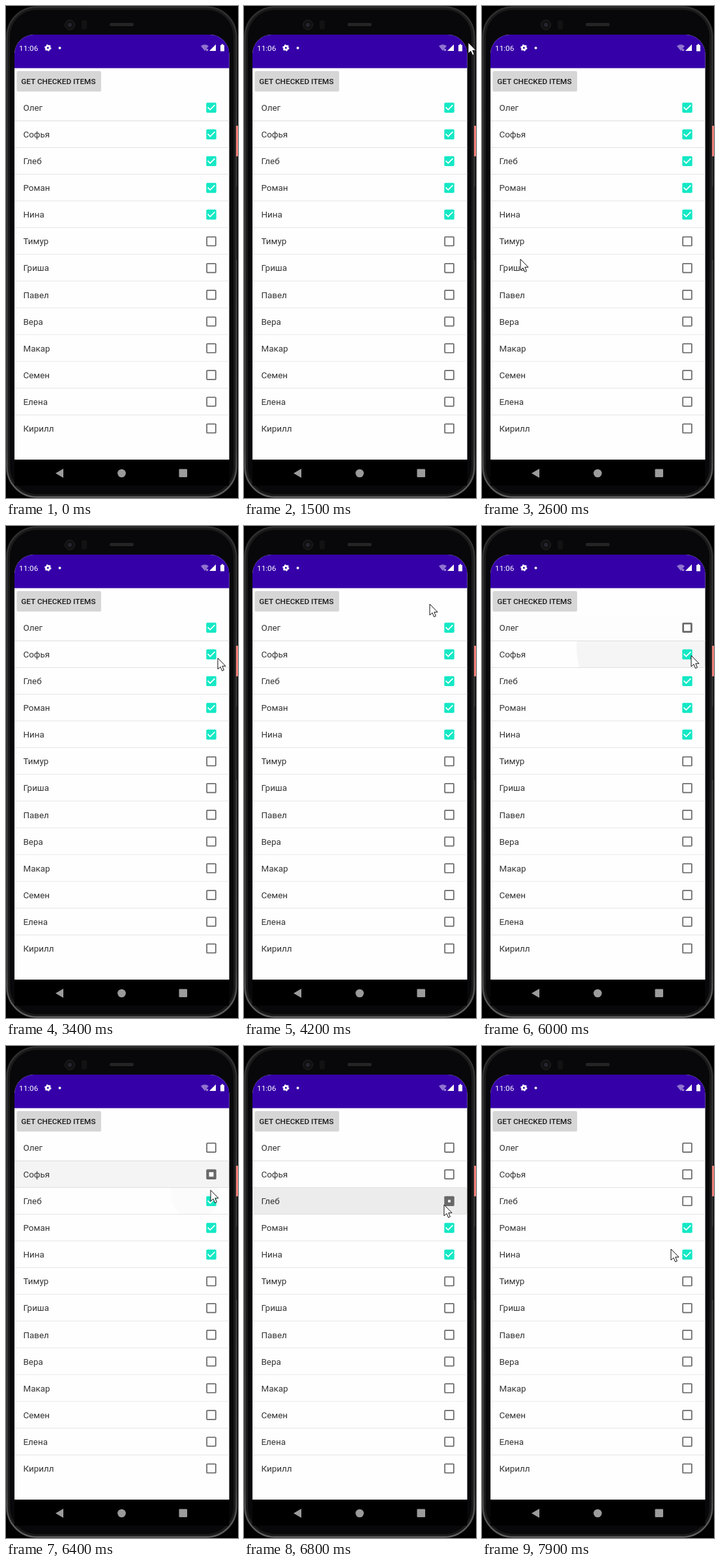
An HTML page for the animation above (8000 ms loop, 356x756 px).

```html
<!DOCTYPE html>
<html lang="ru">
<head>
<meta charset="utf-8">
<style>
  html, body { margin: 0; height: 100%; overflow: hidden; background: #000; }
  svg { display: block; width: 356px; height: 756px; font-family: Roboto, sans-serif; }
</style>
</head>
<body>
<svg viewBox="0 0 356 756">
  <defs>
    <linearGradient id="rim" x2="0" y2="1">
      <stop offset="0" stop-color="#303030"/>
      <stop offset=".9" stop-color="#444"/>
      <stop offset="1" stop-color="#606060"/>
    </linearGradient>
    <clipPath id="screen"><path d="M13 697V74A30 30 0 0 1 43 44H312.5A30 30 0 0 1 342.5 74V697Z"/></clipPath>
  </defs>

  <!-- phone body -->
  <rect x="1.5" y="1.5" width="352" height="753" rx="46" fill="#1a1a1a" stroke="url(#rim)" stroke-width="2.5"/>
  <rect x="6" y="6" width="343" height="744" rx="41" fill="#08080a"/>
  <path d="M13 697h329.5v40H13z"/>
  <path d="M353 184h3v47h-3z" fill="#f08078"/>
  <path d="M353 277h2v113h-2z" fill="#222"/>
  <circle cx="98" cy="29" r="7.5" fill="#111" stroke="#232323"/>
  <circle cx="98" cy="29" r="3" fill="#262630"/>
  <rect x="116" y="22" width="8" height="14" rx="2" fill="#121212"/>
  <rect x="159" y="26" width="37" height="5" rx="2.5" fill="#242424"/>

  <g clip-path="url(#screen)">
    <path d="M13 44h330v653H13z" fill="#fefefe"/>
    <path d="M13 44h330v51.5H13z" fill="#3500a8"/>
    <rect x="16.5" y="100" width="129.5" height="31.5" rx="2" fill="#d6d6d6"/>
    <text x="23.3" y="120.2" font-size="11.8" font-weight="500" fill="#1c1c1c">GET CHECKED ITEMS</text>
    <g id="list"></g>
  </g>

  <!-- status bar -->
  <g fill="#fff">
    <text x="20" y="69" font-size="11.8">11:06</text>
    <circle cx="64.3" cy="64.3" r="2.9" fill="none" stroke="#fff" stroke-width="2.8"/>
    <circle cx="64.3" cy="64.3" r="4.3" fill="none" stroke="#fff" stroke-width="1.8" pathLength="12" stroke-dasharray="1"/>
    <circle cx="82.5" cy="64.5" r="1.9"/>
    <path d="M299 61.5Q305 57 311 61.5L305 69Z" opacity=".45"/>
    <path d="M307 66l3 3m0-3l-3 3" stroke="#fff"/>
    <path d="M322 59v10h-10z"/>
    <path d="M329 60h1.7v-1.4h2.6V60h1.7v9.5h-6z"/>
  </g>

  <!-- navigation -->
  <g fill="#9b9b9b">
    <path d="M76 718l12-7v14z"/>
    <circle cx="177.5" cy="718" r="6.3"/>
    <rect x="265.5" y="711.5" width="12.5" height="12.5" rx="1"/>
  </g>

  <path id="cursor" d="M0 0V17L4 13.4 6.6 19.6 9.4 18.4 6.8 12.3H12Z" fill="#fff" stroke="#111" stroke-linejoin="round"/>
</svg>
<script>
const names = 'Олег Софья Глеб Роман Нина Тимур Гриша Павел Вера Макар Семен Елена Кирилл'.split(' ');
const rowHeight = 41.08, firstTop = 135.8;
const checkedRows = 5, tappedRows = 3;

// Pointer tip: time, x, y
const path = [
  [1500, 344, 56], [2000, 3, 206],
  [2600, 59, 389], [3200, 332, 150], [3600, 318, 256], [4200, 285, 120],
  [4700, 225, 26], [5000, 225, 26], [5300, 299, 141], [6000, 321, 199],
  [6800, 307, 244], [7600, 297, 331], [7900, 290, 312],
];
const pointerVisible = t => t >= 2600 || t >= 1500 && t <= 2000;

const clamp = v => Math.max(0, Math.min(1, v));
const mix = (a, b, p) => a + (b - a) * p;
const cursor = document.getElementById('cursor');
const list = document.getElementById('list');

list.innerHTML = names.map((name, i) => `
  <svg x="13" y="${firstTop + i * rowHeight}" width="330" height="${rowHeight}" viewBox="13 0 330 ${rowHeight}">
    <circle class="ripple" cy="10" r="0"/>
    ${i < names.length - 1 ? '<path d="M13 40.7h330" stroke="#dedede"/>' : ''}
    <text x="26.5" y="25.2" font-size="13.4" fill="#333">${name}</text>
    <rect class="box" x="307.3" y="12.7" width="15.4" height="15.4" rx="1.7"/>
    <rect class="hole" fill="#fefefe"/>
    <path class="tick" d="M309.6 19.8l3.7 3.7 7.1-7.1" fill="none" stroke="#fff" stroke-width="1.7"/>
  </svg>`).join('');
const rows = [...list.children];

function set(row, part, attrs) {
  const el = row.querySelector('.' + part);
  for (const key in attrs) el.setAttribute(key, attrs[key]);
}

function drawRow(row, i, t) {
  const age = i < tappedRows ? t - (5740 + 462 * i) : -1000;  // time since the box toggled
  const off = i < checkedRows ? clamp(age / 300) : 1;
  const hole = 12 * clamp((off - .2) / .8);
  set(row, 'box', { fill: off ? '#686868' : '#14e8c5' });
  set(row, 'hole', { x: 315 - hole / 2, y: 20.4 - hole / 2, width: hole, height: hole });
  set(row, 'tick', { opacity: off ? 0 : 1 });

  // The ripple starts under the finger and spreads to the row's centre
  const grow = clamp((age + 300) / 200);
  const fade = clamp((270 - age) / 130);
  set(row, 'ripple', { cx: mix(315, 178, grow), r: 210 * grow, opacity: .07 * grow * fade });
}

function drawCursor(t) {
  cursor.style.display = pointerVisible(t) ? '' : 'none';
  const next = Math.max(1, path.findIndex(k => k[0] >= t));
  const [t0, x0, y0] = path[next - 1], [t1, x1, y1] = path[next];
  const p = clamp((t - t0) / (t1 - t0));
  cursor.setAttribute('transform', `translate(${mix(x0, x1, p)} ${mix(y0, y1, p)})`);
}

function frame(now) {
  const t = Math.floor(now % 8000 / 100) * 100;
  rows.forEach((row, i) => drawRow(row, i, t));
  drawCursor(t);
  requestAnimationFrame(frame);
}
frame(performance.now());
</script>
</body>
</html>
```
